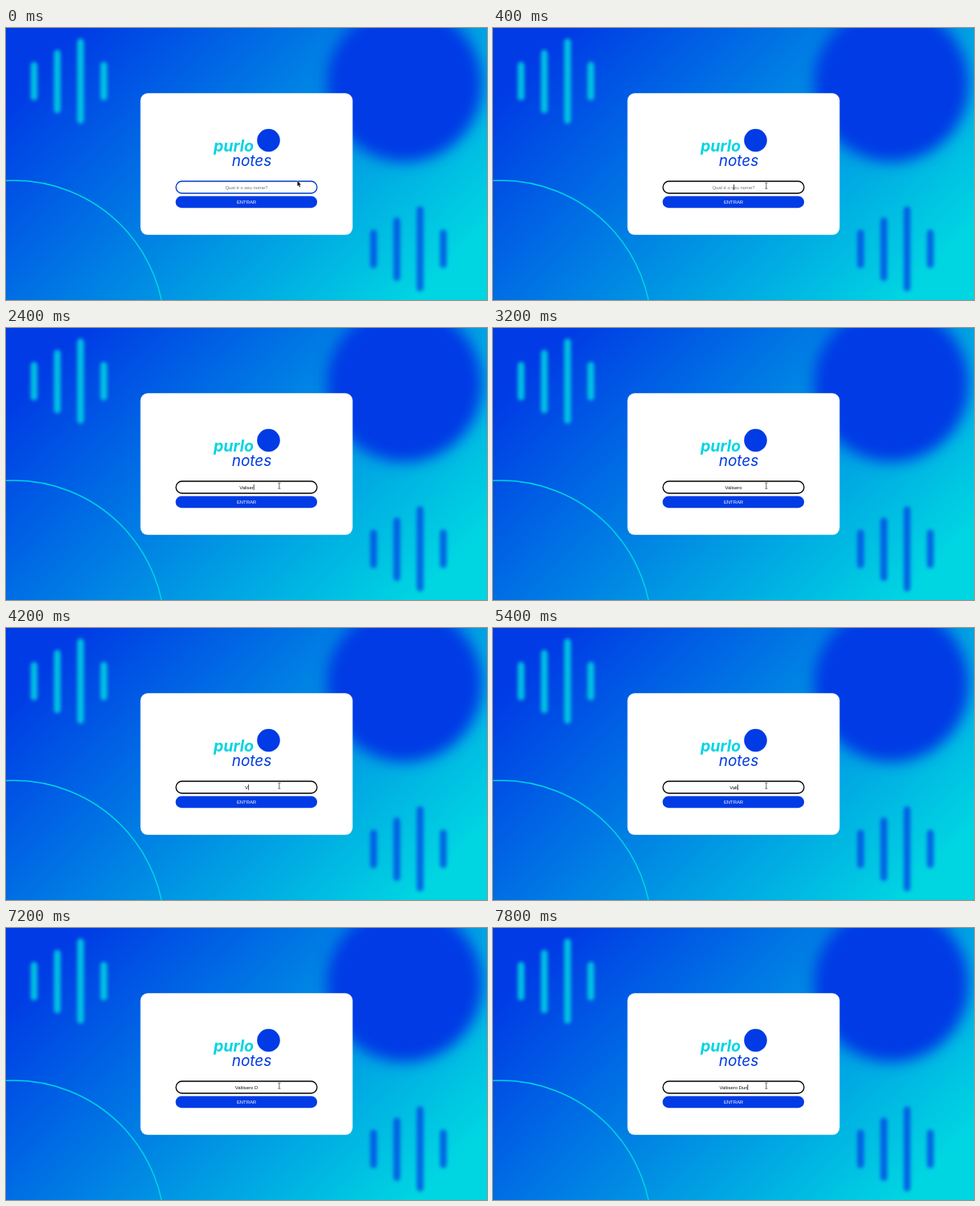
Animation, 600 px wide and 339 px high, one loop 8000 ms. Source, as an HTML page:

```html
<!DOCTYPE html>
<html lang="pt-BR">
<head>
<meta charset="utf-8">
<title>Login</title>
<style>
  html, body { margin: 0; width: 100%; height: 100%; overflow: hidden; }
  svg { display: block; width: 100vw; height: 100vh; }
  .ui { font: 5.9px "Liberation Sans", Arial, sans-serif; text-anchor: middle; white-space: pre; }
  .brand { font-family: Inter, "Open Sans", sans-serif; font-style: italic; text-anchor: middle; }
</style>
</head>
<body>
<svg viewBox="0 0 600 339">
  <defs>
    <linearGradient id="sky" gradientUnits="userSpaceOnUse" x1="65" y1="-65" x2="535" y2="405">
      <stop offset="0.1" stop-color="#003be5"/>
      <stop offset="0.9" stop-color="#00d5e2"/>
    </linearGradient>
    <filter id="softBars" x="-20%" y="-20%" width="140%" height="140%"><feGaussianBlur stdDeviation="2"/></filter>
    <filter id="softDisc" x="-30%" y="-30%" width="160%" height="160%"><feGaussianBlur stdDeviation="9"/></filter>
    <path id="bars" d="M4.5 33.500V73M33.500 18.500V89M62.500 4.500V102M91.500 33.500V73" fill="none" stroke-width="8.500" stroke-linecap="round"/>
  </defs>

  <rect width="600" height="339" fill="url(#sky)"/>
  <circle cx="497" cy="70" r="97" fill="#003be5" filter="url(#softDisc)"/>
  <use href="#bars" x="30.500" y="13" stroke="#00d5e2" opacity="0.85" filter="url(#softBars)"/>
  <use href="#bars" x="454" y="222" stroke="#003be5" opacity="0.7" filter="url(#softBars)"/>
  <circle cx="10" cy="378" r="188" fill="none" stroke="#00d5e2" stroke-width="1.500"/>

  <rect x="167.700" y="81.300" width="264.700" height="176.500" rx="9" fill="#fff"/>
  <text class="brand" x="284" y="154" font-size="19.500" font-weight="700" fill="#00d5e2">purlo</text>
  <text class="brand" x="306.500" y="171.500" font-size="19" fill="#003be5">notes</text>
  <circle cx="327.500" cy="140" r="14.300" fill="#003be5"/>

  <rect id="field" x="212" y="191" width="176" height="15" rx="7.500" fill="#fff" stroke-width="1.300"/>
  <text id="value" class="ui" x="300" y="200.500"></text>
  <rect id="caret" y="195" width="0.700" height="7" fill="#000"/>

  <rect x="211.500" y="209.500" width="176.700" height="14.700" rx="7.350" fill="#003be5"/>
  <text class="ui" x="300" y="219" fill="#fff">ENTRAR</text>

  <path id="arrow" d="M363.300 190v7.300l1.600-1.400 1.200 2.600 1.300-.6-1.200-2.500h2.100z" fill="#111" stroke="#fff" stroke-width="0.300"/>
  <path id="beam" d="M339.400 193.200h1l.5.400.5-.4h1M340.900 193.500v6.400M339.400 200.200h1l.5-.4.500.4h1" fill="none" stroke="#222" stroke-width="0.700"/>
</svg>
<script>
const DURATION = 8000;
const PLACEHOLDER = "Qual é o seu nome?";
const TYPO = "Valisero";
const NAME = "Valtisero Dun";

// Each step: start time, word being typed, letters shown, caret visible
const steps = [
  [0, TYPO, 0, false], [400, TYPO, 0, true],
  [800, TYPO, 1, true], [1200, TYPO, 2, true],
  ...[3, 4, 5, 6, 7, 8].map((n, i) => [1600 + i * 200, TYPO, n, true]),
  [3200, TYPO, 8, false], [3600, TYPO, 4, true], [3800, NAME, 0, true],
  [4200, NAME, 1, true], [4800, NAME, 1, false],
  ...[2, 4, 5, 7, 8, 10].map((n, i) => [5200 + i * 200, NAME, n, true]),
  [6600, NAME, 12, true], [7200, NAME, 11, false],
  [7600, NAME, 12, true], [7800, NAME, 13, true]
];

const [field, value, caret, arrow, beam] =
  ["field", "value", "caret", "arrow", "beam"].map(id => document.getElementById(id));
const show = (el, on) => el.setAttribute("visibility", on ? "visible" : "hidden");

function render(t) {
  const [, word, count, caretOn] = steps.findLast(step => step[0] <= t);
  const typed = word.slice(0, count);
  const text = typed || PLACEHOLDER;
  if (value.textContent !== text) value.textContent = text;
  value.setAttribute("fill", typed ? "#111" : "#757575");
  caret.setAttribute("x", 300 + (typed ? value.getComputedTextLength() / 2 : 0));
  show(caret, caretOn);
  field.setAttribute("stroke", t < 400 ? "#003bc8" : "#000");
  show(arrow, t < 200);
  show(beam, t >= 200);
}

const start = performance.now();
function tick() {
  render((performance.now() - start) % DURATION);
  requestAnimationFrame(tick);
}
tick();
</script>
</body>
</html>
```
